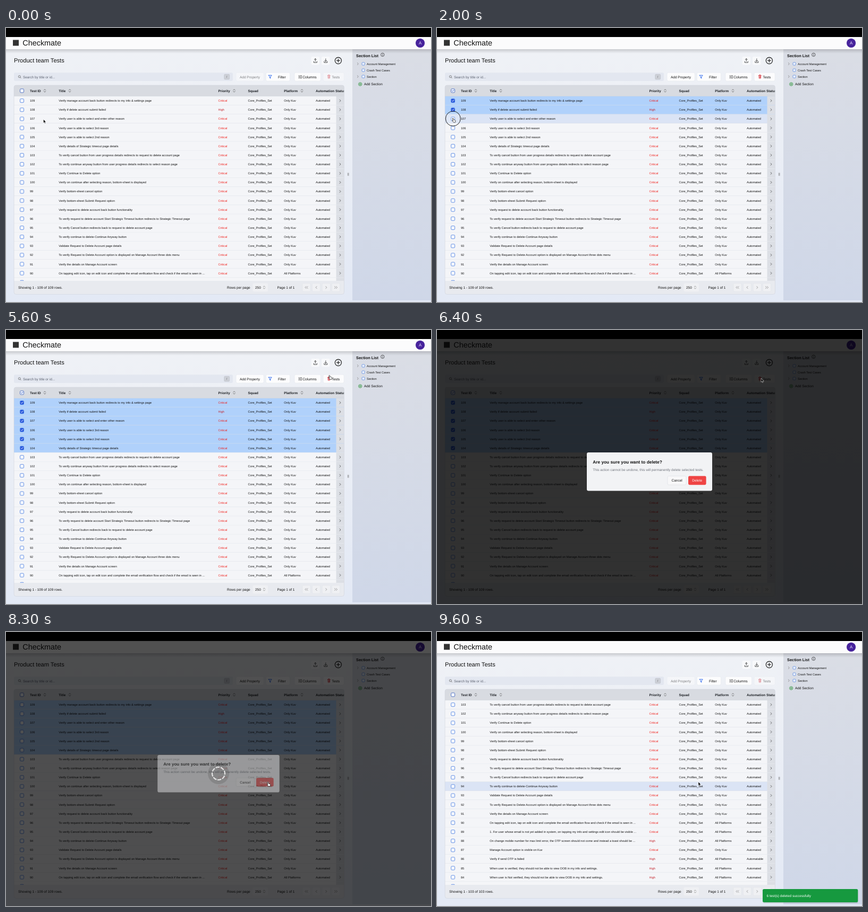
These frames come from a looping animation (800x517 px, 9.8 s). An HTML page:

```html
<!DOCTYPE html>
<html lang="en">
<head>
<meta charset="utf-8">
<title>Checkmate</title>
<style>
html, body { margin: 0; width: 100%; height: 100%; overflow: hidden; background: #e9edf5; }
svg { display: block; width: 100vw; height: 100vh; font-family: "Liberation Sans", Arial, sans-serif; text-rendering: geometricPrecision; }
text { white-space: pre; }
</style>
</head>
<body>
<svg id="stage" viewBox="0 0 800 517"></svg>
<script>
const LOOP = 9800, STEP = 100, ROW = 17.13, TOP = 128.6;
const stage = document.getElementById('stage');

// id | title | flags: H = high priority, A = all platforms, M = automatable
const tests = `Verify manage account back button redirects to my info &amp; settings page
Verify if delete account submit failed|H
Verify user is able to select and enter other reason
Verify user is able to select 3rd reason
Verify user is able to select 2nd reason
Verify details of Strategic timeout page details
To verify cancel button from user progress details redirects to request to delete account page
To verify continue anyway button from user progress details redirects to select reason page
Verify Continue to Delete option
Verify on continue after selecting reason, bottom-sheet is displayed
Verify bottom-sheet cancel option
Verify bottom-sheet Submit Request option
Verify request to delete account back button functionality
To verify request to delete account Start Strategic Timeout button redirects to Strategic Timeout page
To verify Cancel button redirects back to request to delete account page
To verify continue to delete-Continue Anyway button
Validate Request to Delete Account page details
To verify Request to Delete Account option is displayed on Manage Account three dots menu
Verify the details on Manage Account screen
On tapping edit icon, tap on edit icon and complete the email verification flow and check if the email is seen in ...|A
1. For user whose email is not yet added in system, on tapping my info and settings edit icon should be visible ...|A
On change mobile number for max limit error, the OTP screen should not come and instead a toast should be ...|HA
Manage Account option is visible on Kuv
Verify if send OTP is failed|HAM
When user is verified, they should not be able to view DOB in my info and settings.|HA
When user is Not verified, they should not be able to view DOB in my info and settings.|HA
 `.split('\n').map((line, i) => {
  const [title, flags = ''] = line.split('|');
  return { id: 109 - i, title, flags };
});

const path = [[0, 70.5, 172.5], [600, 29.5, 136], [1200, 29.5, 136], [1500, 29.5, 153], [1650, 29.5, 153],
  [1900, 29.2, 170], [2300, 29.2, 170], [2600, 29.5, 187], [2900, 29.5, 187], [3300, 29.5, 203.5],
  [3700, 29.5, 203.5], [4000, 29.5, 221], [4500, 29.5, 221], [5500, 608, 85], [5800, 608, 86],
  [6100, 610, 91.5], [6500, 610, 91.5], [7100, 492, 283], [LOOP, 492, 283]];
const picks = [800, 1400, 1900, 2700, 3400 + STEP, 4200];
const clicks = [...picks, 6000, 7900];

const text = (x, cy, size, s, fill = '#111', extra = '') =>
  `<text x="${x}" y="${cy + size * .36}" font-size="${size}" fill="${fill}" ${extra}>${s}</text>`;
const bold = (x, cy, size, s, fill = '#1d2025') => text(x, cy, size, s, fill, 'font-weight="700"');
const rect = (x, y, w, h, fill, r = 0, extra = '') =>
  `<rect x="${x}" y="${y}" width="${w}" height="${h}" rx="${r}" fill="${fill}" ${extra}/>`;
const circle = (x, y, r, fill, extra = '') => `<circle cx="${x}" cy="${y}" r="${r}" fill="${fill}" ${extra}/>`;
const line = (d, stroke = '#222', w = .8, fill = 'none') =>
  `<path d="${d}" fill="${fill}" stroke="${stroke}" stroke-width="${w}" stroke-linecap="round" stroke-linejoin="round"/>`;
const chevron = (x, y, dir = 1, c = '#333') => line(`M${x - dir} ${y - 2}l${2 * dir} 2l${-2 * dir} 2`, c, .7);
const sorter = (x, y, c = '#444') => line(`M${x - 1.7} ${y - 1}l1.7 -1.7l1.7 1.7m0 2l-1.7 1.7l-1.7 -1.7`, c, .7);
const button = (x, w, body, off) =>
  `<g opacity="${off ? .5 : 1}">${rect(x, 84.2, w, 15.8, '#fcfcfd', 2.4, 'stroke="#e1e4ea" stroke-width=".5"')}${body}</g>`;

function checkbox(x, y, on, header) {
  const fill = on && !header ? '#2453dc' : '#f4f7fd';
  return rect(x - 3.5, y - 3.5, 7, 7, fill, 1.6, `stroke="${header ? '#3158b8' : '#4379df'}" stroke-width=".8"`) +
    (on ? line(`M${x - 1.7} ${y}l1.3 1.4l2.3 -2.8`, header ? '#2453c8' : '#fff', .9) : '');
}

function cursorAt(t) {
  const i = path.findIndex(p => p[0] > t), [t0, x0, y0] = path[i - 1], [t1, x1, y1] = path[i];
  const u = (t - t0) / (t1 - t0), e = u * u * (3 - 2 * u);
  return [x0 + (x1 - x0) * e, y0 + (y1 - y0) * e];
}

const defs = `<defs>
<linearGradient id="page" x2="0" y2="1"><stop stop-color="#f0f2f6"/><stop offset="1" stop-color="#e3e9f5"/></linearGradient>
<linearGradient id="side" x2="0" y2="1"><stop stop-color="#dadde5"/><stop offset="1" stop-color="#cfd7e8"/></linearGradient>
<linearGradient id="shade" x2="0" y2="1"><stop stop-opacity=".16"/><stop offset="1" stop-opacity="0"/></linearGradient>
<clipPath id="table"><rect x="15" y="108" width="621.5" height="394.5" rx="4"/></clipPath>
<clipPath id="body"><rect x="15" y="128" width="621.5" height="349"/></clipPath>
</defs>`;

function sidebar() {
  const items = ['Account Management', 'Crash Test Cases', 'Section'].map((s, i) => {
    const y = 67.6 + 12 * i;
    return (i === 1 ? '' : chevron(662.3, y, .7, '#777')) +
      rect(670, y - 2.6, 5.2, 5.2, '#eaf0fb', 1.3, 'stroke="#4b80de" stroke-width=".7"') + text(679, y, 5.56, s);
  }).join('');
  return rect(652, 40, 148, 474, 'url(#side)') + bold(659, 52, 7.4, 'Section List', '#111') +
    circle(708.8, 50.4, 3.2, 'none', 'stroke="#222" stroke-width=".7"') + line('M708.8 50.2v1.7M708.8 48.8v.1', '#222', .7) +
    items + circle(666.7, 106, 3.1, 'none', 'stroke="#23902f" stroke-width=".8"') +
    line('M665.2 106h3M666.7 104.5v3', '#23902f', .8) + text(674, 106, 6.45, 'Add Section') +
    rect(642.5, 272.5, 3.4, 7, '#d3d6dd', 1) +
    line('M643.5 274.5v.1M644.9 274.5v.1M643.5 276v.1M644.9 276v.1M643.5 277.5v.1M644.9 277.5v.1', '#555', .6);
}

function header() {
  return rect(0, 0, 800, 517, 'url(#page)') + sidebar() + rect(0, 40, 800, 8, 'url(#shade)') +
    rect(0, 17, 800, 23, '#fbfbfc') + rect(0, 0, 800, 17, '#000') +
    rect(13, 22.5, 11, 11, '#333') + text(31.3, 28.3, 14.4, 'Checkmate') +
    circle(779.6, 28.4, 8.6, '#47239c') + text(779.6, 28.5, 8, 'A', '#e9e2ff', 'text-anchor="middle"');
}

function toolbar(active) {
  const tray = 'v2.2h6v-2.2';
  const bin = line('M605.3 89.6h5M606 89.8l.3 5.2h3l.3 -5.2M606.9 89.4v-1h1.8v1M607.2 91.3v2.2M608.4 91.3v2.2', '#d3202a', .8);
  return text(15, 61.5, 11.1, 'Product team Tests') +
    rect(574.5, 54, 15.5, 15.5, '#f8f9fb', 2.4) + rect(594, 54, 15.5, 15.5, '#f8f9fb', 2.4) +
    line(`M579.3 63${tray}M582.3 63v-5M580.4 59.7l1.9 -1.9l1.9 1.9`) +
    line(`M598.8 63${tray}M601.8 58v5M599.9 61.3l1.9 1.9l1.9 -1.9`) +
    circle(625.4, 61.5, 6.1, 'none', 'stroke="#111" stroke-width="1.1"') + line('M622.4 61.5h6M625.4 58.5v6', '#111', 1.1) +
    rect(15, 84.2, 412, 15.8, '#e3e7f0', 2.4) + circle(25.3, 91.7, 2, 'none', 'stroke="#555" stroke-width=".7"') +
    line('M26.8 93.2l1.4 1.4', '#555', .7) + text(32, 92.2, 6.4, 'Search by title or id...', '#5c6270') +
    rect(410.8, 87.3, 9.8, 9.6, '#cdd0d7', 1.5, 'stroke="#b4b8c0" stroke-width=".5"') + text(414.8, 92, 5.5, '/', '#555') +
    button(433, 52.3, text(440, 92.2, 6.5, 'Add Property'), !active) +
    button(489.3, 45.2, line('M494.2 89.2h6l-2.3 2.9v3l-1.4 -.9v-2.1z', '#2563eb', .9) + text(512, 92.2, 6.6, 'Filter')) +
    button(543, 49.5, line('M551 90h1.2M553.6 90h3.2M551 92.2h3.2M555.6 92.2h1.2M551 94.4h1.2M553.6 94.4h3.2') + text(558.2, 92.2, 6.7, 'Columns')) +
    button(597, 39.2, bin + text(613.2, 92.2, 6.5, 'Tests'), !active);
}

function table(s) {
  const rows = s.rows.map(({ id, title, flags }, i) => {
    const y = TOP + i * ROW, cy = y + ROW / 2, has = f => flags.includes(f);
    const fill = i < s.blue ? '#b0d1fb' : i === s.hover ? '#dbe4f5' : '#f4f5f8';
    const cells = i > 19 ? '' : text(45, cy, 5.56, id) + text(99.3, cy, 5.56, title) +
      text(399.5, cy, 5.56, has('H') ? 'High' : 'Critical', has('H') ? '#c4222a' : '#ef1d18') +
      text(455.5, cy, 5.56, 'Core_Profiles_Set') + text(523.3, cy, 5.56, has('A') ? 'All Platforms' : 'Only Kuv') +
      text(583, cy, 5.56, has('M') ? 'Automatable' : 'Automated');
    return rect(15, y, 621.5, ROW, fill) + rect(15, y + ROW - .5, 621.5, .5, '#d9dde5') +
      rect(621.5, y, 15, ROW - .5, '#dcdfe5') + checkbox(30, cy, i < s.checked) + cells + (i > 19 ? '' : chevron(629, cy));
  }).join('');
  const heads = [[45, 'Test ID', 73], [99.3, 'Title', 120], [399.5, 'Priority', 429.5], [455.5, 'Squad'], [523.3, 'Platform', 557], [583, 'Automation Status']]
    .map(([x, name, sx]) => bold(x, 118.4, 6.35, name) + (sx ? sorter(sx, 118.4) : '')).join('');
  const pager = [565.5, 584, 602.8, 621].map((x, i) => {
    const dir = i < 2 ? -1 : 1, c = '#777';
    return rect(x - 7.7, 481.8, 15.4, 15.4, '#eff0f3', 2.2, 'stroke="#dde0e6" stroke-width=".5"') +
      (i % 3 ? chevron(x, 489.5, dir, c) : chevron(x - 1.5, 489.5, dir, c) + chevron(x + 1.5, 489.5, dir, c));
  }).join('');
  const n = s.count;
  return `<g clip-path="url(#table)">${rect(15, 108, 621.5, 394.5, '#e8eaef')}
    <g clip-path="url(#body)">${rows}</g>${rect(15, 108, 621.5, 20.4, '#d8dbe1')}${rect(15, 128, 621.5, .5, '#c9cdd5')}
    ${checkbox(30, 118.4, s.checked > 0, true)}${heads}
    ${text(23, 489.6, 6.45, `Showing 1 - ${n} of ${n} rows.`)}${text(416, 489.6, 6.5, 'Rows per page')}
    ${rect(464.5, 481.8, 28.5, 15.4, '#eff0f3', 2.2)}${text(469, 489.6, 6.45, '250')}${sorter(486, 489.5, '#777')}
    ${text(510.5, 489.6, 6.45, 'Page 1 of 1')}${pager}</g>
    ${rect(15, 108, 621.5, 394.5, 'none', 4, 'stroke="#d0d4dc" stroke-width=".6"')}`;
}

function dialog(k, hover) {
  if (!k) return '';
  return rect(0, 0, 800, 517, '#000', 0, `opacity="${.8 * k}"`) +
    `<g opacity="${k}" transform="translate(400 267.2) scale(${.95 + .05 * k}) translate(-400 -267.2)">
    ${rect(282, 231, 236, 72.5, '#f2f3f5', 3.2)}
    ${bold(293.3, 248.6, 8.3, 'Are you sure you want to delete?', '#111')}
    ${text(293.3, 263.6, 6.45, 'This action cannot be undone, this will permanently delete selected tests.', '#70747c')}
    ${rect(434, 275.6, 35, 16.6, '#f8f8f9', 2.4, 'stroke="#d9dce1" stroke-width=".6"')}${text(441.5, 284, 6.5, 'Cancel')}
    ${rect(473, 275.6, 33.6, 16.6, hover ? '#f0504f' : '#ef4444', 2.4)}${text(480.3, 284, 6.5, 'Delete', '#fff')}</g>`;
}

const spinner = t => circle(400, 267, 20, 'rgba(0,0,0,.12)') +
  circle(400, 267, 12, 'none', `stroke="#e4e4e4" stroke-width="2.2" stroke-dasharray="7.4 2.02" transform="rotate(${t * .36} 400 267)"`);

function toast(t) {
  const dy = 32 * (1 - Math.min(1, (t - 9200) / 300)) ** 2;
  return `<g transform="translate(0 ${dy})">${rect(613.5, 487, 179, 25, 'rgba(0,0,0,.12)', 3)}
    ${rect(613, 485, 179.3, 25, '#16993f', 2.6)}${text(620.5, 497.3, 6.5, '6 test(s) deleted successfully', '#fff')}</g>`;
}

function pointer(x, y, hand) {
  const d = hand
    ? 'M0 .6q1 -1 1.6 .2l.8 2.4l2.5 .7q1 .4 .8 1.6l-.5 2.4h-3.4l-2.4 -2.7q-.2 -1 .9 -.7l.6 .5z'
    : 'M0 0v6.7l1.6 -1.4l1.1 2.5l1.1 -.5l-1.1 -2.4h2.1z';
  return `<g transform="translate(${x} ${y})">${line(d, hand ? '#111' : '#fff', hand ? .7 : .5, hand ? '#fff' : '#000')}</g>`;
}

function draw(t) {
  const done = t >= 9200, loading = t >= 8300 && !done;
  const open = t < 6200 || t >= 8400 ? 0 : t === 8300 ? .45 : Math.min(1, (t - 6100) / 200);
  const picked = done ? 0 : picks.filter(c => t >= c + 200).length;
  const [x, y] = cursorAt(t);
  const overTable = t > 0 && !open && !loading && x > 15 && x < 636 && y > TOP;
  const onDelete = open && x > 473 && x < 507 && y > 275;
  const onTests = !open && t < 6200 && x > 597 && y > 84 && y < 100;
  const state = {
    rows: tests.slice(done ? 6 : 0).slice(0, 21), count: done ? 103 : 109, blue: picked,
    checked: loading ? 0 : picked, hover: overTable ? Math.floor((y + 1 - TOP) / ROW) : -1
  };
  const ring = clicks.some(c => t >= c && t < c + 200);
  stage.innerHTML = defs + header() + toolbar(picked > 0) + table(state) +
    (loading ? rect(0, 0, 800, 517, '#000', 0, 'opacity=".5"') : '') + dialog(open, onDelete) +
    (loading ? spinner(t) : '') + (t > 9200 ? toast(t) : '') +
    (ring ? circle(x + 1, y + 1, 14, 'rgba(255,255,255,.12)', 'stroke="#222" stroke-width="1"') : '') +
    pointer(x, y, x < 35 || onTests || onDelete);
}

let shown = -1;
function tick(now) {
  const t = Math.floor(now % LOOP / STEP) * STEP;
  if (t !== shown) draw(shown = t);
  requestAnimationFrame(tick);
}
draw(0);
requestAnimationFrame(tick);
</script>
</body>
</html>
```
